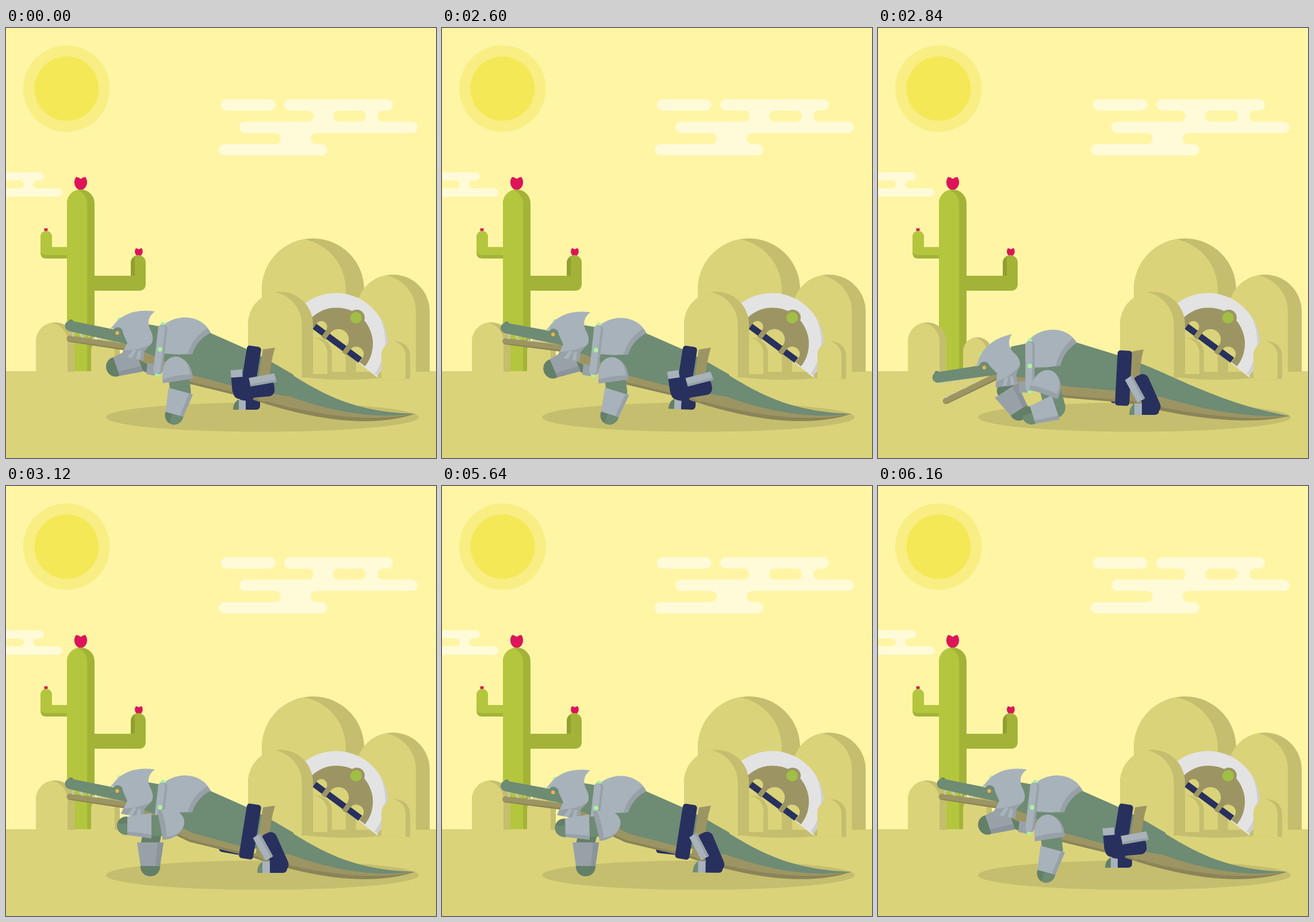
Write an HTML page that moves like this. It is 748 px wide and 748 px high and loops after 6.24 s.

```html
<!DOCTYPE html>
<html lang="en">
<head>
<meta charset="utf-8">
<title>Desert push-ups</title>
<style>
  html, body { margin: 0; width: 100%; height: 100%; overflow: hidden; background: #fff5a5; }
  svg { display: block; width: 100vw; height: 100vh; }
  .sky { fill: #fff5a5; } .cloud { fill: #fffbd9; }
  .sand { fill: #dad37a; } .sandDark { fill: #c5be6e; }
  .cactus { fill: #b4c63e; } .cactusDark { fill: #a3b338; } .cactusDeep { fill: #909f30; }
  .flower { fill: #de145a; }
  .skin { fill: #6e8b74; } .skinDark { fill: #647f68; }
  .belly { fill: #9c9563; } .bellyDark { fill: #8a8458; }
  .steel { fill: #a8b2ba; } .steelDark { fill: #98a1a8; }
  .navy { fill: #28305e; } .gem { fill: #a9f59b; } .tooth { fill: #c4c9c4; }
  .limb { fill: none; stroke-linecap: round; }
</style>
</head>
<body>
<svg viewBox="0 0 748 748">
  <rect class="sky" width="748" height="748"/>
  <circle cx="105.300" cy="105.500" r="75.300" fill="#f9ee84"/>
  <circle cx="105.300" cy="105.500" r="56" fill="#f4e856"/>
  <g id="clouds"></g>

  <rect class="sand" y="597" width="748" height="151"/>
  <g id="cactus"></g>
  <g id="backRocks"></g>
  <path class="sandDark" d="M515 598H653V609Q585 616 515 607Z"/>

  <g transform="translate(574 551) rotate(36.500)">
    <path fill="#e3e3e3" d="M-90 0A90 90 0 0 1 90 0L93 3L60 2L-62 0Z"/>
    <path fill="#cfcfd2" d="M90 0A90 90 0 0 0 30 -85A95 95 0 0 1 84 0Z"/>
    <path class="belly" d="M-63 -2A63 63 0 0 1 63 -2V0H-63Z"/>
    <path class="sand" d="M-49 0V-10A10 10 0 0 1 -29 -10V0ZM-20 0V-10A18 18 0 0 1 16 -10V0ZM25 0V-8A13 13 0 0 1 51 -8V0Z"/>
    <rect class="navy" x="-49" y="-9" width="99" height="11"/>
    <path class="belly" d="M-29 -10H-20V4H-29ZM16 -10H25V4H16Z"/>
  </g>
  <circle class="belly" cx="610" cy="504" r="14"/>
  <circle cx="609" cy="504" r="10" fill="#a1be46"/>
  <g id="frontRocks"></g>
  <ellipse class="sandDark" cx="446" cy="677" rx="272" ry="25.500"/>

  <path id="farUpper" class="limb" stroke="#647f68" stroke-width="32"/>
  <g id="farFore">
    <path class="skinDark" d="M-17 -1V2A17 16 0 0 0 17 2V-1Z"/>
    <path class="steelDark" d="M-17 0H17L23 -41H-23Z"/>
    <path fill="#8b949b" d="M9 0H17L23 -41H13Z"/>
  </g>
  <g id="farLeg">
    <path class="navy" d="M-8 -12H17V17Q17 24 10 24H-8Z"/>
    <path class="steel" d="M-20 6L-8 5V24H-20Z"/>
    <path class="skinDark" d="M-20 6Q-30 11 -30 24H-20Z"/>
  </g>
  <path id="tailShade" class="bellyDark"/>
  <path id="tailBelly" class="belly"/>
  <path id="tail" class="skin"/>
  <path id="belly" class="belly"/>
  <path id="bellyEdge" fill="none" stroke="#8a8458" stroke-width="4"/>
  <path id="body" class="skin"/>
  <path id="cloth" class="belly"/>
  <rect id="belt" class="navy" x="-12.500" y="-48" width="25" height="96" rx="5"/>

  <g id="jaw">
    <path class="belly" d="M111 535L215 550L240 571L215 562L111 546A5.500 5.500 0 0 1 111 535Z"/>
    <path class="bellyDark" d="M108 544L215 559V562L111 546Z"/>
    <path class="tooth" d="M114 536L117 531L119 537ZM130 538L133 533L135 539ZM149 541L152 537L154 542ZM167 543L169 539L172 544Z"/>
  </g>
  <g id="head">
    <path class="tooth" d="M115 529L120 530L117 535ZM128 531L133 533L129 537ZM143 535L147 536L144 540ZM158 538L162 539L159 543Z"/>
    <circle class="skinDark" cx="113" cy="511" r="4"/>
    <path class="skin" d="M112 509L186 524L235 520V562L210 550L109 527A9.200 9.200 0 0 1 112 509Z"/>
    <circle class="gem" cx="198" cy="508" r="4.500"/>
    <path class="steel" d="M180 525L192 511Q216 487 259 493Q243 505 250 523Q259 539 253 549L240 561L239 578L200 570L211 548L203 530Q192 517 180 525Z"/>
    <path class="steelDark" d="M204 561Q235 560 253 549L241 562L239 578L233 576L231 563L226 576L219 575L224 563L211 572L200 570Z"/>
    <path class="steel" d="M211 572L222 559L227 561L218 574ZM226 576L230 561L235 562L233 577Z"/>
    <circle class="skin" cx="194" cy="530" r="9.500"/>
    <circle id="iris" cx="193.500" cy="530.500" r="3.200" fill="#edb54a"/>
  </g>

  <g id="plate">
    <path class="steel" d="M273 518C295 497 340 497 356 530Q332 542 324 567L300 568L270 566Z"/>
    <path class="steelDark" d="M356 530Q332 542 324 567L316 568Q322 541 350 522Z"/>
  </g>
  <g id="strap">
    <path class="steelDark" d="M-22 24L-8 26L-8 46L-24 43Z"/>
    <g transform="rotate(6.600)">
      <circle class="gem" cy="-44" r="4"/><circle class="gem" cy="44" r="4"/>
      <rect class="steelDark" x="-7.500" y="-43" width="16" height="86" rx="6"/>
      <rect class="steel" x="-7.500" y="-43" width="12" height="86" rx="6"/>
      <circle class="gem" r="4"/>
    </g>
  </g>

  <path id="nearUpper" class="limb" stroke="#6e8b74" stroke-width="36"/>
  <g id="nearFore">
    <path class="skinDark" d="M-16 -1V2A16 16 0 0 0 16 2V-1Z"/>
    <path class="skin" d="M-4 -1V17A16 16 0 0 0 16 2V-1Z"/>
    <path class="steel" d="M-16 0H16L22 -42H-22Z"/>
    <path class="steelDark" d="M10 0H16L22 -42H15Z"/>
  </g>
  <g id="shoulder">
    <path class="steelDark" d="M-26 24C-34 -32 24 -36 26 16Z"/>
    <path class="steel" d="M-26 17C-33 -32 18 -36 21 9Q-3 9 -26 17Z"/>
  </g>

  <g id="foot">
    <path class="skin" d="M-29 15H-38Q-38 0 -28 -5Z"/>
    <path class="steel" d="M-29 -5H-15V15H-29Z"/>
    <path class="navy" d="M-16 -5H14V7Q14 15 6 15H-16Z"/>
  </g>
  <g id="thigh">
    <rect class="navy" x="-12" y="-58" width="28" height="72" rx="11"/>
    <path class="steel" d="M-23 -60L-8 -63L-4 -17L-19 -15Z"/>
    <path class="steelDark" d="M-12 -62L-8 -63L-4 -17L-8 -16Z"/>
  </g>
</svg>
<script>
const $ = id => document.getElementById(id);
const shape = (cls, d) => `<path class="${cls}" d="${d}"/>`;
const pill = (cls, x1, x2, y, h = 19.5) =>
  `<rect class="${cls}" x="${x1}" y="${y}" width="${x2 - x1}" height="${h}" rx="${h / 2}"/>`;
const box = (cls, x1, x2, y, h) =>
  `<rect class="${cls}" x="${x1}" y="${y}" width="${x2 - x1}" height="${h}"/>`;

// Round-topped column; the lit part is the same dome moved left to end at `edge`.
function arch(x1, x2, top, bottom, edge, light = 'sand', dark = 'sandDark') {
  const r = (x2 - x1) / 2, y = top + r, half = (x2 - edge) / 2;
  const start = `M${x1} ${bottom}V${y}A${r} ${r} 0 0 1 `;
  const crossing = `${x1 + r - half} ${y - Math.sqrt(r * r - half * half)}`;
  return shape(dark, `${start}${x2} ${y}V${bottom}Z`) +
    shape(light, `${start}${crossing}A${r} ${r} 0 0 1 ${edge} ${y}V${bottom}Z`);
}

const flower = (x, y, s) => `<g transform="translate(${x} ${y}) scale(${s})">` +
  shape('flower', 'M0 0C-11 -3 -14 -15 -8 -23.500Q-3 -23 0 -20Q3 -23 8 -23.500C14 -15 11 -3 0 0Z') + '</g>';

$('clouds').innerHTML =
  box('cloud', 525, 656, 142, 22) + pill('sky', 490, 535, 143.5) + pill('sky', 569, 626, 143.5) + pill('sky', 646, 690, 143.5) +
  box('cloud', 468, 540, 182, 21) + pill('sky', 440, 478, 182.5) + pill('sky', 530, 570, 182.5) +
  pill('cloud', 374, 468.5, 124) + pill('cloud', 484, 673, 124) +
  pill('cloud', 406, 716, 163) + pill('cloud', 370, 559, 202) +
  box('cloud', 20, 56, 264, 16) + pill('sky', -20, 31, 265, 14) + pill('sky', 47, 75, 265, 14) +
  pill('cloud', -20, 66, 251, 14) + pill('cloud', -20, 98, 279, 14.5);

$('cactus').innerHTML =
  flower(130, 282.5, 1) + flower(69.5, 354.5, .28) + flower(231, 397.5, .62) +
  shape('cactusDark', 'M60 363A10 10 0 0 1 80 363V381H107V401H70Q60 401 60 391Z') +
  shape('cactus', 'M60 363A10 10 0 0 1 80 363V381H107V395H70Q60 395 60 387Z') +
  shape('cactusDark', 'M154 431H217V408A13 13 0 0 1 243 408V445Q243 457 231 457H154Z') +
  shape('cactusDeep', 'M217 431V408Q218 402 224 398V431Z') +
  arch(106, 154, 281, 597, 141, 'cactus', 'cactusDark') +
  arch(52, 119, 512, 598, 107) + arch(148, 198, 538, 598, 189);

$('backRocks').innerHTML = arch(445, 623, 366, 598, 591) + arch(609, 737, 429, 598, 713);
$('frontRocks').innerHTML = arch(515, 567, 539, 602, 559) +
  arch(421, 534, 459, 608, 514.5) + arch(653, 703, 545, 610.5, 695);

// Outlines as [raised, lowered].
const outlines = {
  cloth: ['M447 559L468 556Q460 582 458 612L450 652L434 642Z', 'M441 563L462 559Q456 582 455 612L447 650L432 642Z'],
  tailShade: ['M712 671C650 692 555 690 425 645L470 630Q590 672 712 671Z',
              'M716 675C650 690 560 684 425 650L470 632Q590 668 716 675Z'],
  tailBelly: ['M712 671C650 684 560 682 425 641L470 630Q590 672 712 671Z',
              'M716 675C650 684 560 676 425 645L470 632Q590 668 716 675Z'],
  tail: ['M445 572C522 614 575 668 712 671C640 680 570 670 480 636Z', 'M440 577C520 606 590 652 716 675C640 678 570 666 480 638Z'],
  belly: ['M205 553L262 568L325 600L430 628L430 645L410 641L320 619L262 592L215 570Z',
          'M215 598L258 606L325 621L430 632L430 651L410 650L325 643L262 629L225 613Z'],
  bellyEdge: ['M262 590L320 617L410 639', 'M262 627L325 641L410 648'],
  body: ['M235 513L272 520L350 528L420 559L462 581L500 603L498 633Q495 642 485 640L407 626L325 604L262 572L210 552Z',
         'M232 554L262 548L345 547L420 570L460 585L500 602L498 634Q495 643 485 642L415 631L325 623L258 608L210 605Z']
};

// Poses: raised A, lowered, raised B, lowered again. Two entries mean raised, lowered.
// Each is [x, y, angle].
const rigid = {
  belt: [[424.5, 601, 9.2], [427, 609, 3]],
  strap: [[268, 559, 0], [264, 588, -6.6]],
  farLeg: [[425, 640, 0], [420, 628, 60], [396, 623, 100], [425, 640, 0]],
  farFore: [[192, 589, 71], [245, 665, -33], [251, 661, 0], [226, 658, 1.5]],
  nearFore: [[293, 672, 15], [269, 673, 72], [211, 591, 90], [295, 675, 53]],
  shoulder: [[299, 594, 0], [297, 619, 28], [288, 589, 88], [301, 619, 24]],
  foot: [[408, 623, 85], [475, 658, 0], [475, 658, 0], [464, 650, 22]],
  thigh: [[409, 629, 85], [475, 658, -24], [475, 658, -24], [464, 651, 8]]
};
// Parts drawn in place: pivot, then shift and turn when lowered.
const hinged = {
  head: [194, 530, -9, 60, -20.5],
  jaw: [215, 560, 0, 46, -34.5],
  plate: [315, 540, -9, 21, -5]
};
const farShoulder = [[258, 588], [258, 612]];

const LOOP = 6240, STEP = 40, HALF = 280;
const moves = [2560, 2840, 5600, 5880];   // start of each half movement
const blinks = [1200, 1480, 4480, 4760];

// Same curve as CSS ease-in-out.
function ease(x) {
  let lo = 0, hi = 1;
  for (let i = 0; i < 20; i++) {
    const s = (lo + hi) / 2, q = 1 - s;
    if (1.26 * q * q * s + 1.74 * q * s * s + s * s * s < x) lo = s; else hi = s;
  }
  return lo * lo * (3 - 2 * lo);
}

function render(time) {
  const t = Math.floor(time % LOOP / STEP) * STEP;
  let from = 0, e = 0;
  moves.forEach((start, i) => {
    if (t >= start) { from = i; e = ease(Math.min(1, (t - start) / HALF)); }
  });
  const mix = (a, b) => a + (b - a) * e;
  const pick = keys => {
    const a = keys[from % keys.length], b = keys[(from + 1) % keys.length];
    return a.map((v, i) => mix(v, b[i]));
  };
  const dip = pick([[0], [1]])[0];

  for (const id in outlines) {
    const low = outlines[id][1].match(/-?[\d.]+/g);
    let i = 0;
    $(id).setAttribute('d', outlines[id][0].replace(/-?[\d.]+/g, n => +n + (low[i++] - n) * dip));
  }
  const now = {};
  for (const id in rigid) {
    const [x, y, a] = now[id] = pick(rigid[id]);
    $(id).setAttribute('transform', `translate(${x} ${y}) rotate(${a})`);
  }
  for (const id in hinged) {
    const [x, y, dx, dy, a] = hinged[id];
    $(id).setAttribute('transform', `translate(${dx * dip} ${dy * dip}) rotate(${a * dip} ${x} ${y})`);
  }
  const upperArm = (id, [sx, sy], [x, y, a]) => {
    const r = a * Math.PI / 180;
    $(id).setAttribute('d', `M${sx} ${sy}L${x + 41 * Math.sin(r)} ${y - 41 * Math.cos(r)}`);
  };
  upperArm('farUpper', pick(farShoulder), now.farFore);
  upperArm('nearUpper', now.shoulder, now.nearFore);

  $('iris').style.visibility = blinks.includes(t) ? 'hidden' : 'visible';
}

const begin = performance.now();
(function tick() {
  render(performance.now() - begin);
  requestAnimationFrame(tick);
})();
</script>
</body>
</html>
```
